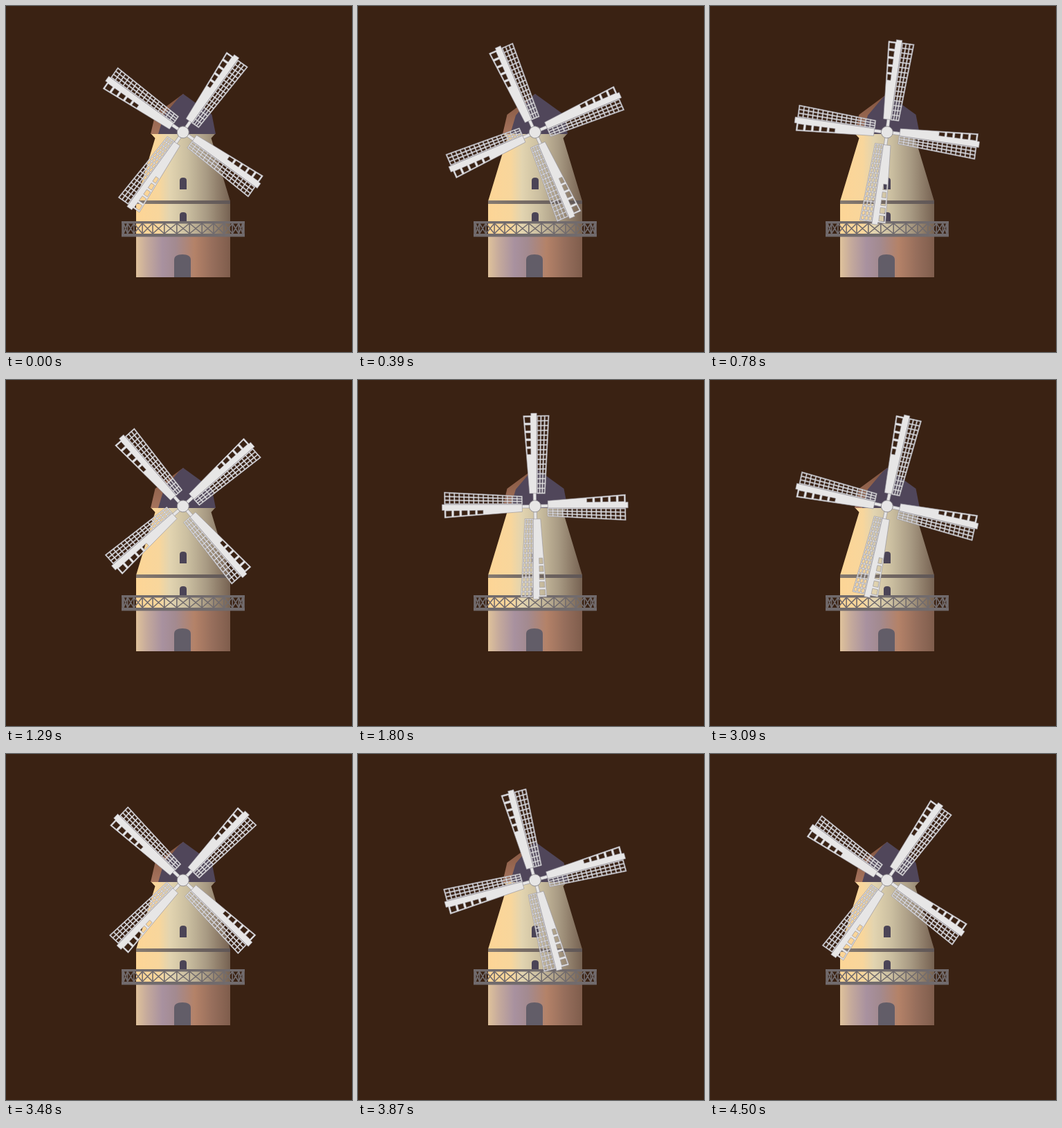
Animation, 500 px wide and 500 px high, one loop 4.53 s. Source, as an HTML page:

```html
<!DOCTYPE html>
<html lang="en">
<head>
<meta charset="utf-8">
<title>Windmill</title>
<style>
html, body { margin: 0; width: 100%; height: 100%; overflow: hidden; background: #3a2213; }
svg { display: block; width: 100vw; height: 100vh; }
</style>
</head>
<body>
<svg viewBox="0 0 500 500">
  <defs>
    <linearGradient id="wall" gradientUnits="userSpaceOnUse" x1="188" y1="0" x2="324" y2="0">
      <stop offset="0" stop-color="#fdd596"/>
      <stop offset=".24" stop-color="#f8d69c"/>
      <stop offset=".36" stop-color="#e2d4b0"/>
      <stop offset=".55" stop-color="#cabea0"/>
      <stop offset=".75" stop-color="#a89a83"/>
      <stop offset=".9" stop-color="#8a7865"/>
      <stop offset="1" stop-color="#766252"/>
    </linearGradient>
    <linearGradient id="base" gradientUnits="userSpaceOnUse" x1="188" y1="0" x2="324" y2="0">
      <stop offset="0" stop-color="#dfc29b"/>
      <stop offset=".12" stop-color="#c4a99c"/>
      <stop offset=".28" stop-color="#a8919f"/>
      <stop offset=".42" stop-color="#a38a90"/>
      <stop offset=".62" stop-color="#b48268"/>
      <stop offset=".82" stop-color="#956d5b"/>
      <stop offset="1" stop-color="#7f5d4c"/>
    </linearGradient>
    <linearGradient id="eave" x1="0" y1="0" x2="0" y2="1">
      <stop offset="0" stop-color="#80533e"/>
      <stop offset="1" stop-color="#a6745d"/>
    </linearGradient>
    <linearGradient id="band" gradientUnits="userSpaceOnUse" x1="188" y1="0" x2="324" y2="0">
      <stop offset="0" stop-color="#857a70"/>
      <stop offset="1" stop-color="#5f5656"/>
    </linearGradient>
  </defs>
  <rect width="500" height="500" fill="#3a2213"/>
  <path d="M188 329H324V392H188Z" fill="url(#base)"/>
  <path d="M209 184H303L296.5 191L324 282V330H188V282L215.5 191Z" fill="url(#wall)"/>
  <path d="M188 281H324V286H188Z" fill="url(#band)"/>
  <path d="M256 127L215.5 157L209 185H224L258 130Z" fill="url(#eave)"/>
  <path d="M256 127L297.5 157L303 185H220L228 158L250 132Z" fill="#50465a"/>
  <g fill="#4b4456">
    <path d="M251 265V252Q251 248 256 248T261 252V265Z"/>
    <path d="M251 311V302Q251 298 256 298T261 302V311Z"/>
  </g>
  <path d="M243 392V367Q243 359 255 359T267 367V392Z" fill="#625d68"/>
  <g fill="none" stroke="#716b6d">
    <path d="M167 312.8H345" stroke-width="3.4"/>
    <path d="M167 331.3H345" stroke-width="4.6"/>
    <path id="rail" stroke-width="1.6"/>
  </g>
  <g id="sails" fill="#e7e6e6" stroke="#94919a" stroke-width=".6"></g>
</svg>
<script>
const CX = 255.8, CY = 182.4, STEP = 30, LOOP = 4530, TURN = 4500, START = 35;
const sails = document.getElementById('sails');
const mix = (a, b, k) => a + (b - a) * k;
const poly = pts => 'M' + pts.map(([x, r]) => `${x.toFixed(2)} ${(-r).toFixed(2)}`).join('L') + 'Z';

// Sail edges at radius r, in local units
const along = (a, b) => r => mix(a, b, (r - 18) / 113);
const left = along(-7.6, -14.8), inner = along(2.8, 4.7), outer = along(15, 22.7);

const hole = (x0, x1, r0, r1) => poly([[x0(r0), r0], [x1(r0), r0], [x1(r1), r1], [x0(r1), r1]]);

function lattice() {
  const rows = 16, cols = 3, bar = 1.5, pitch = (113 - bar) / rows;
  let d = hole(inner, outer, 18, 131);
  for (let i = 0; i < rows; i++) {
    const r = 18 + bar + i * pitch;
    for (let c = 0; c < cols; c++) {
      const at = (k, pad) => q => mix(inner(q), outer(q) - bar, k / cols) + pad;
      d += hole(at(c, bar), at(c + 1, 0), r, r + pitch - bar);
    }
  }
  return d;
}

function board() {
  let d = poly([[left(18.5), 18.5], [2.8, 18.5], [4.7, 131], [4.8, 134.4], [-3.7, 134.4], [-3.7, 131], [left(131), 131]]);
  for (let i = 0; i < 5; i++) {
    const r = 75 + i * 11.4;
    d += hole(q => left(q) + 1.7, () => -4.6, r, r + 8.2);
  }
  return d;
}

const blade = `<path d="M-2.4 0V-20H2V0Z"/><path fill-rule="evenodd" d="${lattice()}"/><path fill-rule="evenodd" d="${board()}"/>`;
sails.innerHTML = [0, 90, 180, 270].map(a => `<g transform="rotate(${a})">${blade}</g>`).join('') +
  '<circle r="8.5" stroke="#8f8c90" stroke-width=".9"/>';

// Evenly spaced posts on a round balcony, seen from the front
const posts = Array.from({ length: 16 }, (_, i) => 256 + 88 * Math.sin((i * 12 - 90) * Math.PI / 180));
document.getElementById('rail').setAttribute('d', posts.map((x, i) => {
  const n = posts[i + 1];
  return `M${x} 312V332` + (n ? `M${x} 314L${n} 329M${n} 314L${x} 329` : '');
}).join(''));

function draw(ms) {
  const t = Math.floor((ms % LOOP) / STEP) * STEP;
  sails.setAttribute('transform', `translate(${CX} ${CY}) rotate(${START + 360 * t / TURN})`);
}

const begin = performance.now();
function tick() {
  draw(performance.now() - begin);
  requestAnimationFrame(tick);
}
draw(0);
requestAnimationFrame(tick);
</script>
</body>
</html>
```
